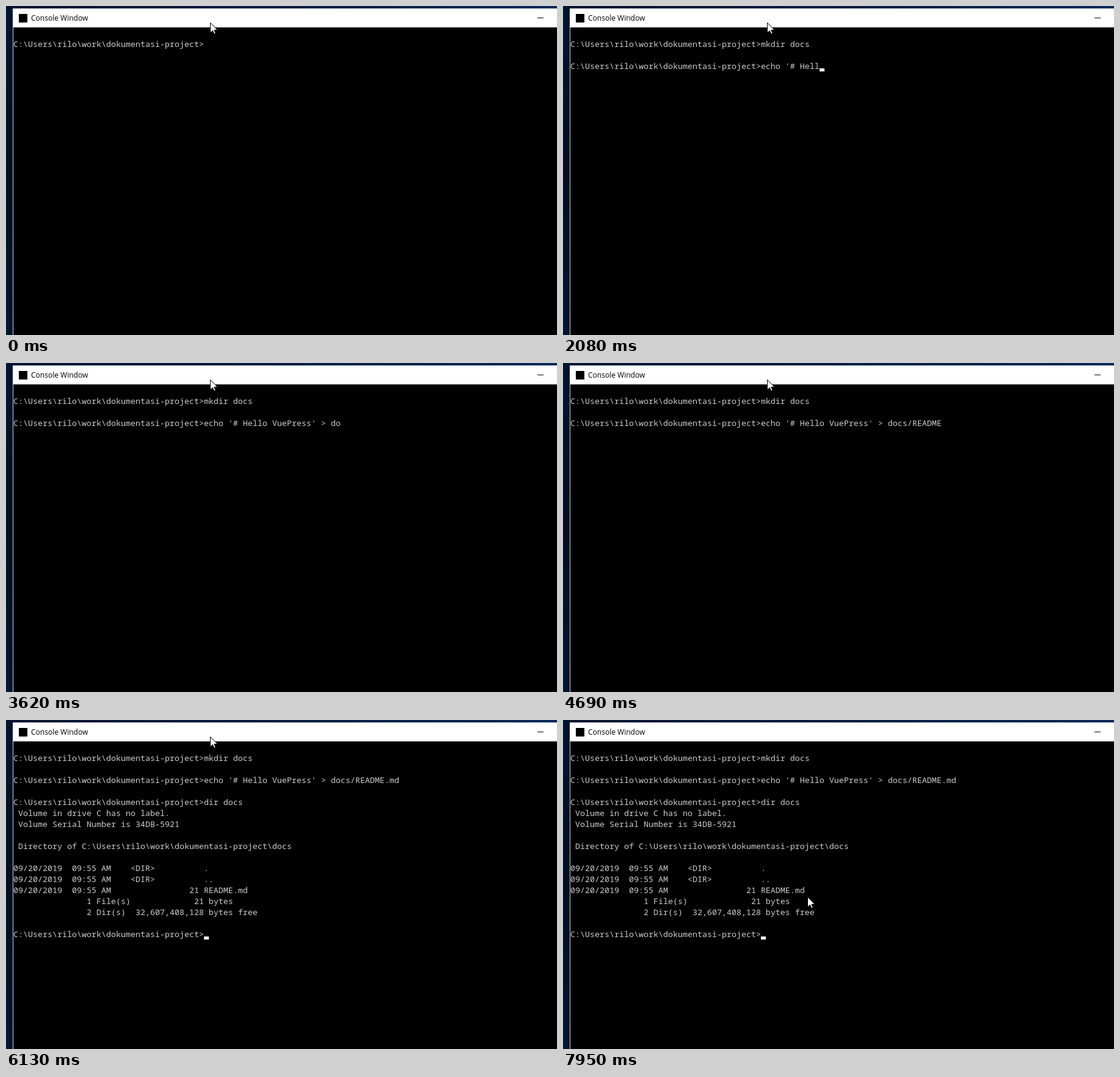
An HTML page with a canvas for the animation above (8000 ms loop, 902 by 538 pixels).

```html
<!DOCTYPE html>
<html lang="en">
<head>
<meta charset="utf-8">
<title>Console</title>
<style>
html, body { margin: 0; width: 100%; height: 100%; overflow: hidden; background: #000; }
canvas { display: block; }
</style>
</head>
<body>
<canvas id="stage" width="902" height="538"></canvas>
<script>
const ctx = document.getElementById('stage').getContext('2d');
const LOOP = 8000, CELL = 8, LINE = 18, LEFT = 12, BASE = 67;
const OUTPUT = 6100, READY = 6130, BLINK = 450;
const PATH = 'C:\\Users\\rilo\\work\\dokumentasi-project';
const PROMPT = PATH + '>';

// Prompt appears at `show`, keys run from `from` to `to`; pace < 1 slows down, > 1 speeds up
const commands = [
  { text: 'mkdir docs', show: 0, from: 0, to: 780, pace: 1 },
  { text: "echo '# Hello VuePress' > docs/README.md", show: 890, from: 1110, to: 4990, pace: 0.815 },
  { text: 'dir docs', show: 5140, from: 5290, to: 5940, pace: 3 }
];

const stamp = '09/20/2019  09:55 AM';
const gap = n => ' '.repeat(n);
const dirEntry = name => stamp + gap(4) + '<DIR>' + gap(10) + name;
const listing = [
  ' Volume in drive C has no label.',
  ' Volume Serial Number is 34DB-5921',
  '',
  ' Directory of ' + PATH + '\\docs',
  '',
  dirEntry('.'),
  dirEntry('..'),
  stamp + gap(16) + '21 README.md',
  gap(15) + '1 File(s)' + gap(13) + '21 bytes',
  gap(15) + '2 Dir(s)  32,607,408,128 bytes free',
  '',
  PROMPT
];

const progress = (t, from, to) => Math.min(1, Math.max(0, (t - from) / (to - from)));
const smooth = p => p * p * (3 - 2 * p);

function rect(color, x, y, w, h) {
  ctx.fillStyle = color;
  ctx.fillRect(x, y, w, h);
}

function fade(x, y, colors) {
  const g = ctx.createLinearGradient(0, 0, x, y);
  colors.forEach((c, i) => g.addColorStop(i / (colors.length - 1), c));
  return g;
}

function write(row, text) {
  ctx.fillStyle = '#cccccc';
  ctx.fillText(text, LEFT, BASE + row * LINE);
}

function caret(row, col) {
  rect('#ffffff', LEFT + col * CELL, BASE - 1 + row * LINE, CELL, 5);
}

function drawWindow() {
  rect(fade(0, 538, ['#00193a', '#001029', '#001a3b']), 0, 0, 12, 538);
  rect(fade(902, 0, ['#001530', '#001c40', '#042a57']), 0, 0, 902, 4);
  rect(fade(11, 0, ['rgba(0,0,0,0)', 'rgba(0,0,0,0.35)']), 0, 4, 11, 534);
  rect('#d4d7dc', 11, 4, 1, 534);
  rect('#000000', 12, 35, 890, 503);
  rect('#ffffff', 11, 4, 891, 31);
  rect('#000000', 21, 13, 14, 14);
  rect('#000000', 870, 19, 10, 1);
  ctx.font = '12px "Open Sans", "Noto Sans", sans-serif';
  ctx.fillStyle = '#000000';
  ctx.fillText('Console Window', 41, 24);
}

function drawCommand({ text, show, from, to, pace }, row, t, active) {
  if (t < show) return;
  const typed = text.length * progress(t, from, to) ** pace;
  const count = Math.floor(typed);
  write(row, PROMPT + text.slice(0, count));
  // each key press hides the caret for half a beat
  const resting = t < from || t > to;
  if (active && (resting || typed - count >= 0.5)) caret(row, PROMPT.length + count);
}

function drawTerminal(t) {
  ctx.font = '13.3333px "Noto Sans Mono", "DejaVu Sans Mono", monospace';
  commands.forEach((cmd, i) => {
    const next = commands[i + 1];
    drawCommand(cmd, i * 2, t, t < (next ? next.show : OUTPUT));
  });
  if (t < OUTPUT) return;
  const shown = t < READY ? 5 : listing.length;
  listing.slice(0, shown).forEach((line, i) => write(5 + i, line));
  if (t >= READY && Math.floor((t - READY) / BLINK) % 2 === 0) caret(16, PROMPT.length);
}

function pointerAt(t) {
  const step = Math.floor((t - 90) / 100) * 100 + 90;
  const u = smooth(progress(step, 6190, 7105));
  const drift = Math.sin(Math.PI * progress(step, 7105, 7890));
  return [334 + 66 * u ** 3.65 + 4 * drift, 27 + 262 * u + 6 * drift];
}

function drawPointer(t) {
  const [x, y] = pointerAt(t).map(Math.round);
  ctx.save();
  ctx.translate(x, y);
  ctx.beginPath();
  [[0.5, 0.5], [0.5, 16.9], [4.3, 13.3], [6.9, 18.8], [9.2, 17.8], [6.8, 12.4], [12, 12.1]]
    .forEach(([px, py]) => ctx.lineTo(px, py));
  ctx.closePath();
  ctx.fillStyle = '#ffffff';
  ctx.fill();
  ctx.strokeStyle = '#000000';
  ctx.stroke();
  ctx.restore();
}

const start = performance.now();
function frame() {
  const t = (performance.now() - start) % LOOP;
  drawWindow();
  drawTerminal(t);
  drawPointer(t);
  requestAnimationFrame(frame);
}
frame();
</script>
</body>
</html>
```
